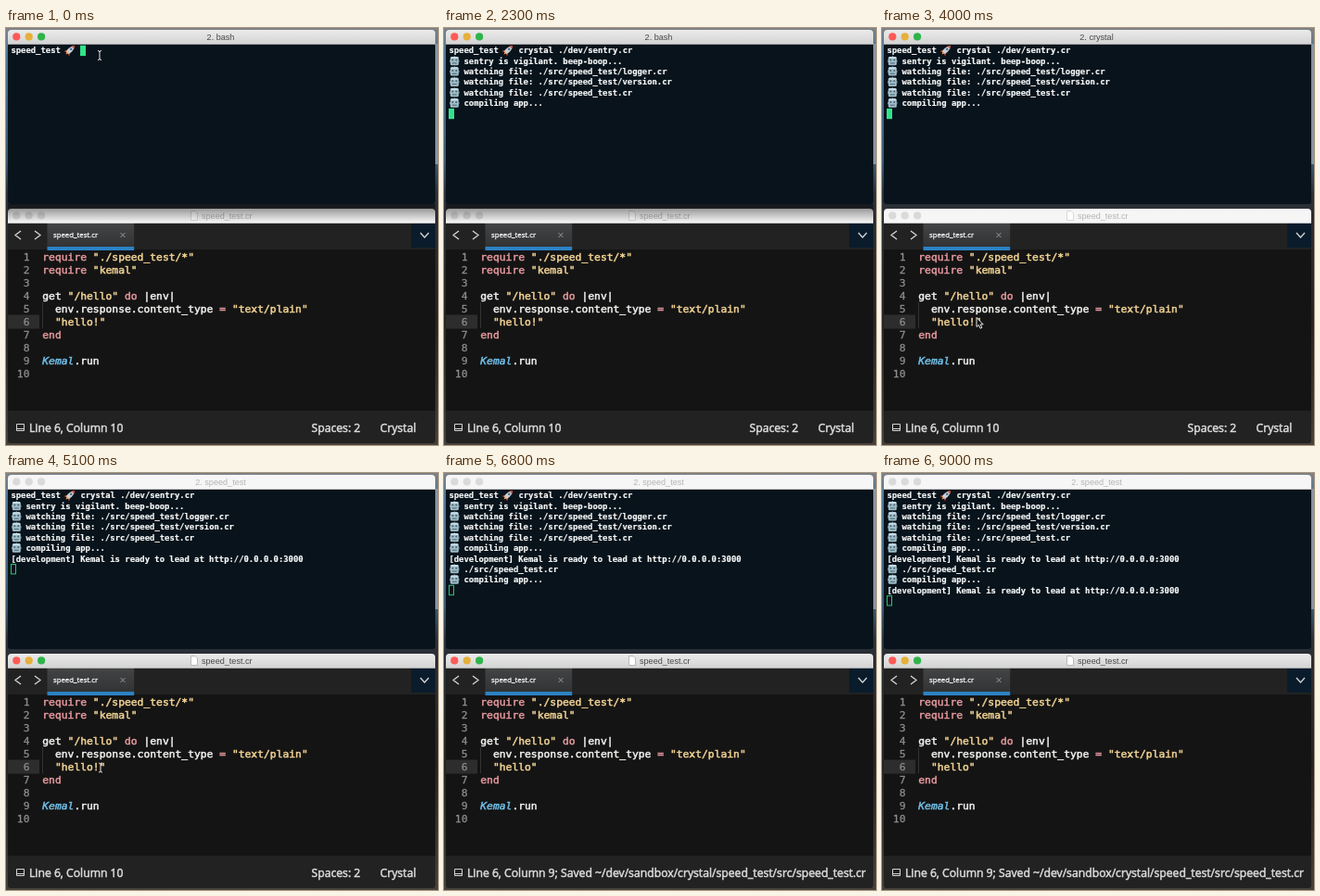
Recreate the animation shown at these times as an HTML page. Size 466 px wide and 450 px high, loop 9100 ms.

```html
<!DOCTYPE html>
<html lang="en">
<head>
<meta charset="utf-8">
<title>Terminal and editor</title>
<style>
html, body { margin: 0; width: 100%; height: 100%; overflow: hidden; background: #222; }
svg { display: block; width: 466px; height: 450px; }
text { white-space: pre; }
.term { font: bold 8.9px "DejaVu Sans Mono", monospace; fill: #f6f8f8; stroke: #f6f8f8; stroke-width: .2px; }
.code { font: 11.33px "DejaVu Sans Mono", monospace; fill: #f2f2f0; stroke: #f2f2f0; stroke-width: .5px; }
.num { fill: #8c8c8c; stroke: #8c8c8c; stroke-width: .3px; text-anchor: end; }
.key { fill: #e5989d; stroke: #e5989d; }
.str { fill: #f2d394; stroke: #f2d394; }
.cls { fill: #71bfe8; stroke: #71bfe8; font-style: italic; }
.title { font: 9.1px "Liberation Sans", Arial, sans-serif; }
.tab { font: 7.8px "Open Sans", sans-serif; fill: #f0f0f0; stroke: #f0f0f0; stroke-width: .3px; }
.status { font: 12.2px "Open Sans", sans-serif; fill: #dcdcdc; stroke: #dcdcdc; stroke-width: .5px; }
.line { fill: none; stroke: #d5d5d5; stroke-width: 1.3px; }
</style>
</head>
<body>
<svg viewBox="0 0 466 450">
  <defs>
    <linearGradient id="desk" x2="0" y2="1">
      <stop stop-color="#7f8285"/>
      <stop offset=".06" stop-color="#4f7697"/>
      <stop offset=".32" stop-color="#3d5872"/>
      <stop offset=".4" stop-color="#2b3038"/>
      <stop offset=".7" stop-color="#252423"/>
      <stop offset="1" stop-color="#46413a"/>
    </linearGradient>
    <linearGradient id="bar" x2="0" y2="1">
      <stop stop-color="#ebebeb"/>
      <stop offset="1" stop-color="#d3d3d3"/>
    </linearGradient>
    <linearGradient id="shade" x2="0" y2="1">
      <stop stop-opacity=".5"/>
      <stop offset="1" stop-opacity="0"/>
    </linearGradient>
    <linearGradient id="tab" x2="0" y2="1">
      <stop stop-color="#434445"/>
      <stop offset="1" stop-color="#313335"/>
    </linearGradient>
    <g id="robot">
      <path d="M5.500 0V2M.8 4.500V7M10.200 4.500V7" stroke="#8a8f93"/>
      <rect x="1" y="1" width="9" height="9.300" rx="1.500" fill="#9fbdca"/>
      <rect x="1.500" y="1" width="8" height="2" rx="1" fill="#c6dbe3"/>
      <circle cx="3.600" cy="4.600" r="1" fill="#47616c"/>
      <circle cx="7.400" cy="4.600" r="1" fill="#47616c"/>
      <rect x="3" y="7.300" width="5" height="1.300" fill="#5d7883"/>
    </g>
    <g id="rocket" transform="rotate(45)">
      <path d="M-2 2L-4 6L0 4.5L4 6L2 2Z" fill="#c84638"/>
      <path d="M-1.300 4.500L0 7L1.300 4.500Z" fill="#f0a23c"/>
      <path d="M0-6.500Q3.600-2 2 4.500H-2Q-3.600-2 0-6.500Z" fill="#c9cdd0"/>
      <path d="M0-6.500Q1.600-5 2-3.500H-2Q-1.600-5 0-6.500Z" fill="#c84638"/>
      <circle cy="-1" r="1.200" fill="#406a8b"/>
    </g>
    <path id="arrow" d="M0-5.5V4.5L2.3 2.5L4 6.2L5.8 5.4L4.2 1.9H7.2Z" fill="#111" stroke="#fff" stroke-width=".9"/>
    <path id="beam" d="M-2-5Q0-5 0-3.5Q0-5 2-5M0-3.5V3.5M-2 5Q0 5 0 3.5Q0 5 2 5" fill="none" stroke="#e8e8e8"/>
  </defs>

  <rect width="466" height="450" fill="url(#desk)"/>
  <rect x="463" y="17" width="3" height="130" fill="#8795a2"/>
  <path d="M2 17H463V187Q463 190 460 190H5Q2 190 2 187Z" fill="#08131b"/>
  <path d="M2 210H463V445Q463 448 460 448H5Q2 448 2 445Z" fill="#222"/>
  <rect x="2" y="239" width="461" height="174" fill="#141414"/>
  <rect x="44.500" y="210" width="93.700" height="27" fill="url(#tab)"/>
  <rect x="44.500" y="236" width="93.700" height="4" fill="#2c82c4"/>
  <rect x="437" y="210" width="26" height="27" fill="#0a1c2c"/>
  <rect x="2" y="309.500" width="34" height="15" fill="#2d2d2d"/>
  <path d="M39.500 296V324" stroke="#333"/>
  <path class="line" d="M16 219L10 223.5L16 228M31 219L37 223.5L31 228M447 221L451.500 226L456 221"/>
  <path class="line" style="stroke:#999;stroke-width:1px" d="M123.500 221L128.500 226M128.500 221L123.500 226"/>
  <text class="tab" x="51" y="226">speed_test.cr</text>
  <path class="line" style="stroke-width:1px" d="M11.500 427.500H19.500V434.500H11.500ZM11.500 432.500H19.500"/>
  <g id="code"></g>
  <g id="live"></g>
</svg>
<script>
const LOOP = 9100, CELL = 5.36, ROW = 11.35, LEFT = 5.4;
const command = "crystal ./dev/sentry.cr";
const ready = "[development] Kemal is ready to lead at http://0.0.0.0:3000";

// Terminal output: time in ms, text, robot in front
const log = [
  [1800, "sentry is vigilant. beep-boop...", 1],
  [1800, "watching file: ./src/speed_test/logger.cr", 1],
  [1800, "watching file: ./src/speed_test/version.cr", 1],
  [1800, "watching file: ./src/speed_test.cr", 1],
  [1800, "compiling app...", 1],
  [4600, ready, 0],
  [6400, "./src/speed_test.cr", 1],
  [6400, "compiling app...", 1],
  [8500, ready, 0]
];

// Pointer path: time, x, y
const path = [[2500, 101, 29], [3400, 114, 326], [3700, 114, 326], [4000, 102, 318]];

const $ = id => document.getElementById(id);
const text = (cls, x, y, s, more = "") => `<text class="${cls}" x="${x}" y="${y}" ${more}>${s}</text>`;
const span = (cls, s) => `<tspan class="${cls}">${s}</tspan>`;
const key = s => span("key", s), str = s => span("str", s);
const use = (id, x, y) => `<use href="#${id}" x="${x}" y="${y}"/>`;

const codeY = i => 250.5 + 14.05 * i;
const codeLine = (i, s) => text("code", 39.3, codeY(i), s);

const source = [
  key("require ") + str('"./speed_test/*"'),
  key("require ") + str('"kemal"'),
  "",
  "get " + str('"/hello"') + key(" do ") + "|env|",
  "  env.response.content_type " + key("= ") + str('"text/plain"'),
  "",
  key("end"),
  "",
  span("cls", "Kemal") + ".run",
  ""
];

$("code").innerHTML = source.map((s, i) =>
  text("code num", 25.5, codeY(i), i + 1) + codeLine(i, s)).join("");

function titleBar(y, active, title, icon) {
  const lights = active ? ["#fc5b57", "#e5b03c", "#2eb44a"] : Array(3).fill("#dadada");
  const end = y + 15.7;
  return `<path d="M2 ${end}V${y + 4}Q2 ${y} 6 ${y}H459Q463 ${y} 463 ${y + 4}V${end}Z" fill="${active ? "url(#bar)" : "#f6f6f6"}"/>` +
    lights.map((c, i) => `<circle cx="${11.3 + 13.4 * i}" cy="${y + 7.4}" r="4.1" fill="${c}"/>`).join("") +
    (icon ? `<path d="M199.500 ${y + 2.5}H204L206.500 ${y + 5}V${y + 12.5}H199.500Z" fill="#fff" stroke="${active ? "#aaa" : "#d0d0d0"}" stroke-width=".8"/>` : "") +
    text("title", icon ? 211 : 231.5, y + 10.7, title,
      `fill="${active ? "#484848" : "#b4b4b4"}" text-anchor="${icon ? "start" : "middle"}"`);
}

function terminal(t, active) {
  const typed = command.slice(0, Math.max(0, Math.ceil((t - 100) / 1100 * command.length)));
  const lines = log.filter(l => t >= l[0]);
  const base = 27.4;
  let out = text("term", LEFT, base, "speed_test") + `<g transform="translate(69.500 23.500)">${use("rocket", 0, 0)}</g>` +
    text("term", LEFT + 14 * CELL, base, typed);
  lines.forEach(([, s, robot], i) => {
    const y = base + ROW * (i + 1);
    out += (robot ? use("robot", 5.8, y - 8.8) : "") + text("term", LEFT + (robot ? 3 * CELL : 0), y, s);
  });
  const x = lines.length ? 5 : LEFT + (14 + typed.length) * CELL - .4;
  const y = 18.8 + ROW * (lines.length ? lines.length + 1 : 0);
  return out + (active
    ? `<rect x="${x}" y="${y}" width="6" height="11.300" fill="#30e48b"/>`
    : `<rect x="${x + .5}" y="${y + .3}" width="5" height="10.400" fill="none" stroke="#2bc477"/>`);
}

function pointer(t, editing) {
  if (t < 200) return use("beam", 101, 29.5);
  if (t < path[0][0] || t >= 5600) return "";
  let [, x, y] = path[path.length - 1];
  const i = path.findIndex(p => p[0] > t);
  if (i > 0) {
    const [a, b] = [path[i - 1], path[i]];
    const u = (t - a[0]) / (b[0] - a[0]), e = u * u * (3 - 2 * u);
    x = a[1] + (b[1] - a[1]) * e;
    y = a[2] + (b[2] - a[2]) * e;
  }
  return use(editing || y < 190 ? "beam" : "arrow", x, y);
}

function draw(t) {
  const editing = t >= 4200, edited = t >= 5700, saved = t >= 6200;
  const job = t < 2600 ? "bash" : t < 4600 ? "crystal" : "speed_test";
  const place = `Line 6, Column ${edited ? 9 : 10}`;
  // The terminal casts a shadow on the editor until the command takes over
  const shadow = job === "bash" ? '<rect x="2" y="190" width="461" height="20" fill="url(#shade)"/>' : "";
  $("live").innerHTML =
    titleBar(2, !editing, "2. " + job) + titleBar(195, editing, "speed_test.cr", true) + shadow +
    terminal(t, !editing) +
    codeLine(5, str(edited ? '  "hello"' : '  "hello!"')) +
    text("status", 25, 435.5, saved ? place + "; Saved ~/dev/sandbox/crystal/speed_test/src/speed_test.cr" : place) +
    (saved ? "" : text("status", 329.5, 435.5, "Spaces: 2") + text("status", 403.5, 435.5, "Crystal")) +
    pointer(t, editing);
}

let last = -1;
const start = performance.now();
function tick() {
  const step = Math.floor((performance.now() - start) % LOOP / 100);
  if (step !== last) draw((last = step) * 100);
  requestAnimationFrame(tick);
}
tick();
</script>
</body>
</html>
```
